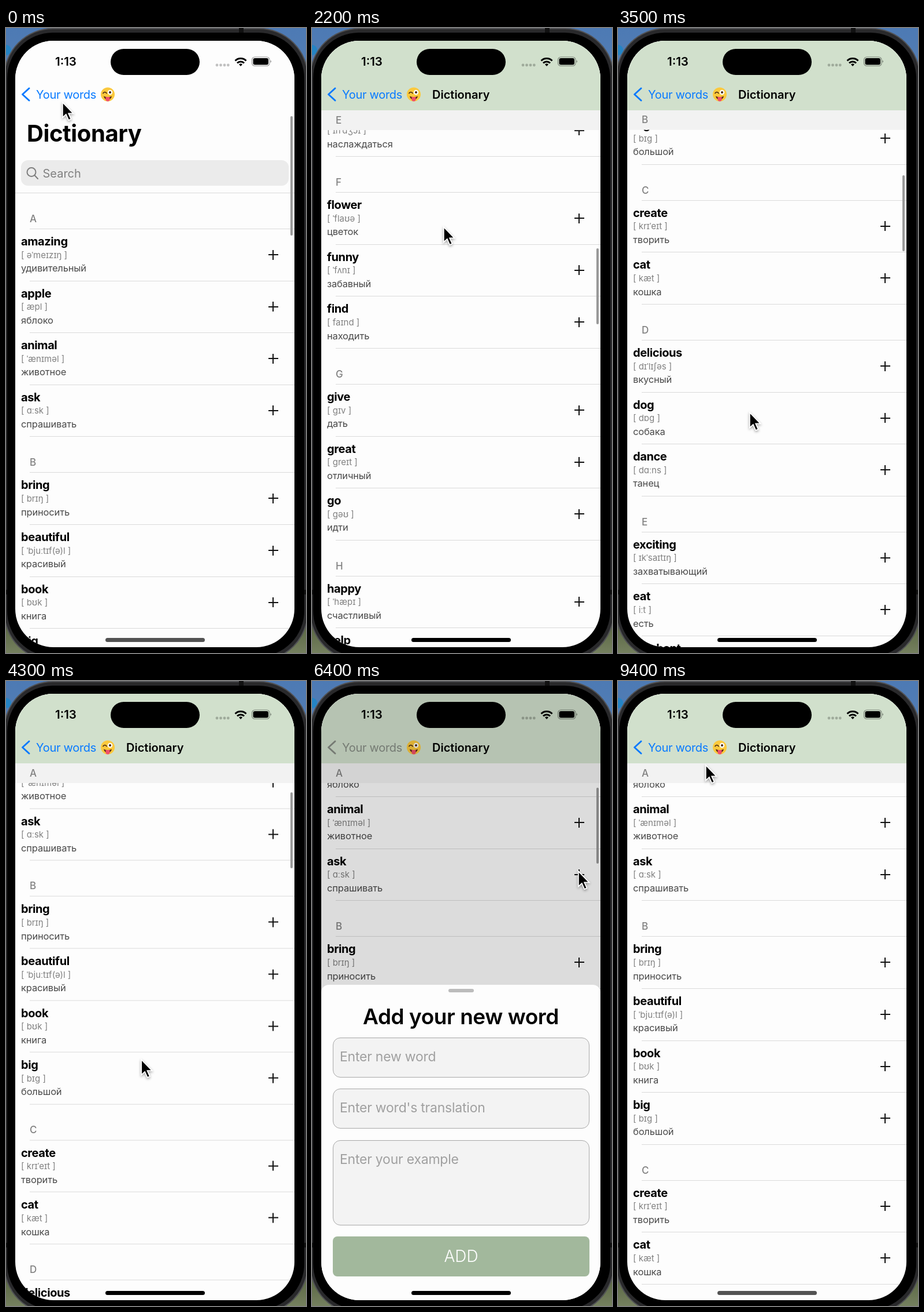
An HTML page for the animation above (9500 ms loop, 519 by 1078 pixels).

```html
<!DOCTYPE html>
<html lang="en">
<head>
<meta charset="utf-8">
<title>Dictionary</title>
<style>
html, body { margin: 0; width: 100%; height: 100%; overflow: hidden; background: #000; }
body { position: relative; font-family: Inter, "Noto Sans", sans-serif; color: #000; }
div, svg { position: absolute; box-sizing: border-box; }
.full { left: 0; top: 0; width: 519px; height: 1078px; }
.text { white-space: pre; line-height: 1.2; transform: translateY(-50%); }
#screen { background: #fdfdfd; clip-path: inset(22px 20px 10px 16px round 66px); }
#list { left: 0; top: 284px; width: 519px; }
.head { left: 16px; width: 483px; height: 34px; z-index: 1; }
.head.pinned { background: #f2f2f2; }
.head .text { left: 25px; top: 17px; font-size: 17px; font-weight: 500; color: #808080; }
.line { left: 41px; width: 458px; height: 1px; background: #dadada; }
.row { left: 0; width: 519px; height: 89.6px; }
.row .text { left: 26px; }
.word { top: 22px; font-size: 20px; font-weight: 700; letter-spacing: -.02em; }
.sound { top: 45.7px; font-size: 15px; color: #808080; }
.meaning { top: 69.3px; font-size: 16.5px; letter-spacing: -.01em; color: #4a4a4a; }
.plus { left: 453.5px; top: 44px; width: 17px; height: 2px; background: #111; }
.plus::after { content: ""; position: absolute; left: 7.5px; top: -7.5px; width: 2px; height: 17px; background: #111; }
#nav { left: 0; top: 0; width: 519px; height: 142px; background: #fdfdfd; }
#navTint { inset: 0; background: #d1e0cc; }
#back { left: 52px; top: 114.5px; font-size: 20px; letter-spacing: -.015em; }
#navTitle { left: 208px; top: 114.5px; font-size: 20px; font-weight: 600; }
#large { left: 16px; top: 142px; width: 483px; overflow: hidden; background: #fdfdfd; border-bottom: 1px solid #dadada; }
#largeTitle { left: 20px; top: 40px; font-size: 40px; font-weight: 700; letter-spacing: -.01em; }
#search { left: 10px; top: 86px; width: 463px; border-radius: 12px; background: #ebebeb; overflow: hidden; color: #808080; font-size: 20px; }
#bar { left: 491.5px; width: 4px; border-radius: 2px; background: #999; }
#dim { background: #000; }
#sheet { left: 16px; top: 524px; width: 483px; height: 560px; border-radius: 13px 13px 0 0; background: #fdfdfd; }
#grabber { left: 220px; top: 7px; width: 44px; height: 6px; border-radius: 3px; background: #bcbcbc; }
#sheetTitle { left: 0; width: 483px; top: 55px; text-align: center; font-size: 37px; font-weight: 600; letter-spacing: -.012em; }
.field { left: 20px; width: 444px; border: 1.3px solid #a8a8a8; border-radius: 13px; background: #f3f3f3; }
.field .text { left: 11px; top: 33px; font-size: 23px; letter-spacing: -.01em; color: #a0a0a0; }
#add { left: 20px; top: 433.5px; width: 444px; height: 69px; border-radius: 8px; background: #a2b89c; }
#add .text { left: 0; width: 100%; top: 35px; text-align: center; font-size: 28px; font-weight: 300; color: #fff; }
#home { left: 172px; top: 1052px; width: 172px; height: 7px; border-radius: 4px; }
#time { left: 85px; top: 58px; font-size: 20.5px; font-weight: 600; }
#cursor { left: -4px; top: -4px; overflow: visible; filter: drop-shadow(0 2px 2px rgba(0,0,0,.35)); }
</style>
</head>
<body>
<svg class="full" viewBox="0 0 519 1078">
  <defs>
    <linearGradient id="wall" x2="0" y2="1">
      <stop offset="0" stop-color="#4d7ab4"/><stop offset=".5" stop-color="#7795b5"/>
      <stop offset=".95" stop-color="#56633f"/><stop offset="1" stop-color="#75805f"/>
    </linearGradient>
  </defs>
  <rect width="519" height="1078" fill="url(#wall)"/>
  <circle cx="0" cy="38" r="9" fill="#2584c4"/>
  <rect x="-3" y="1" width="525" height="1090" rx="84" fill="#29292b" stroke="#515255" stroke-width="2"/>
  <path d="M403 0h8v8h-8zM0 969h3v8h-3zM516 969h3v8h-3z" fill="#111"/>
  <rect x="2" y="8" width="514" height="1076" rx="79"/>
</svg>

<div id="screen" class="full">
  <div id="list"></div>
  <div id="large">
    <div id="largeTitle" class="text">Dictionary</div>
    <div id="search">
      <svg width="44" height="44" fill="none" stroke="#7f7f7f" stroke-width="2" stroke-linecap="round">
        <circle cx="18" cy="20.5" r="7.5"/><path d="M23.5 26l5.5 6"/>
      </svg>
      <div class="text" style="left:37.5px;top:22.5px">Search</div>
    </div>
  </div>
  <div id="nav">
    <div id="navTint"></div>
    <svg width="519" height="142">
      <path id="chevron" d="M40 104L28.5 114.5L40 125" fill="none" stroke-width="3" stroke-linecap="round" stroke-linejoin="round"/>
      <g transform="translate(176 114.5)">
        <circle r="12" fill="#fbc93d"/>
        <circle cx="4" cy="-3.5" r="4.2" fill="#fff"/><circle cx="4" cy="-3.5" r="2" fill="#4b2c14"/>
        <path d="M-8-2q3-4 6 0" fill="none" stroke="#4b2c14" stroke-width="1.7" stroke-linecap="round"/>
        <path d="M-7 3q7 3 14 0q-1 6-7 6t-7-6" fill="#5a2b12"/>
        <path d="M-3.5 4.5h7v4a3.5 3.5 0 0 1-7 0z" fill="#f0506a"/>
      </g>
      <g fill="#000" fill-opacity=".24">
        <circle cx="365" cy="64" r="2.4"/><circle cx="371.5" cy="64" r="2.4"/>
        <circle cx="378" cy="64" r="2.4"/><circle cx="384.3" cy="64" r="2.4"/>
      </g>
      <g fill="none" stroke="#000" stroke-width="3">
        <path d="M396.5 56.5a13.5 13.5 0 0 1 19 0M400 60.5a8.5 8.5 0 0 1 12 0"/>
      </g>
      <path d="M406 66l-3-3.2a4.4 4.4 0 0 1 6 0z"/>
      <rect x="425.5" y="50" width="30.5" height="15.5" rx="5" fill="none" stroke="#000" stroke-opacity=".4" stroke-width="1.2"/>
      <rect x="427.5" y="52" width="26.5" height="11.5" rx="3.2"/>
      <path d="M457.5 55.5q3 2 0 4.5z" fill-opacity=".45"/>
    </svg>
    <div id="time" class="text">1:13</div>
    <div id="back" class="text">Your words</div>
    <div id="navTitle" class="text">Dictionary</div>
  </div>
  <div id="bar"></div>
  <div id="dim" class="full"></div>
  <div id="sheet">
    <div id="grabber"></div>
    <div id="sheetTitle" class="text">Add your new word</div>
    <div class="field" style="top:91px;height:68.5px"><div class="text">Enter new word</div></div>
    <div class="field" style="top:179px;height:68.5px"><div class="text">Enter word's translation</div></div>
    <div class="field" style="top:268px;height:147px"><div class="text">Enter your example</div></div>
    <div id="add"><div class="text">ADD</div></div>
  </div>
  <div id="home"></div>
  <div style="left:181px;top:36px;width:154px;height:45px;border-radius:23px;background:#000"></div>
</div>

<svg id="cursor" width="30" height="42">
  <path transform="translate(4 4)" d="M.8 1V27.5L6.8 22L11.3 32L15.6 30.2L11.2 20.3H19.5Z" stroke="#fff" stroke-width="1.8"/>
</svg>

<script>
const LOOP = 9500, STEP = 100, ROW = 89.6, GAP = 28, HEAD = 34, LIST_TOP = 284, NAV = 142;

const dictionary = {
  A: ["amazing|əˈmeɪzɪŋ|удивительный", "apple|æpl|яблоко", "animal|ˈænɪməl|животное", "ask|ɑːsk|спрашивать"],
  B: ["bring|brɪŋ|приносить", "beautiful|ˈbjuːtɪf(ə)l|красивый", "book|bʊk|книга", "big|bɪɡ|большой"],
  C: ["create|krɪˈeɪt|творить", "cat|kæt|кошка"],
  D: ["delicious|dɪˈlɪʃəs|вкусный", "dog|dɒɡ|собака", "dance|dɑːns|танец"],
  E: ["exciting|ɪkˈsaɪtɪŋ|захватывающий", "eat|iːt|есть", "elephant|ˈelɪfənt|слон", "enjoy|ɪnˈdʒɔɪ|наслаждаться"],
  F: ["flower|ˈflaʊə|цветок", "funny|ˈfʌnɪ|забавный", "find|faɪnd|находить"],
  G: ["give|ɡɪv|дать", "great|ɡreɪt|отличный", "go|ɡəʊ|идти"],
  H: ["happy|ˈhæpɪ|счастливый", "help|help|помогать", "house|haʊs|дом"]
};

// Keyframes: time, then values; motion eases between neighbours.
const scrollKeys = [[0, 0], [600, 0], [1400, 950], [2200, 1896], [2800, 1896], [3500, 890], [4500, 338], [5200, 338], [5500, 326]];
const cursorKeys = [[0, 97, 127], [600, 227, 760], [1100, 227, 342], [1500, 227, 720], [2000, 227, 342], [2700, 227, 342],
  [3300, 227, 662], [4200, 227, 662], [5200, 452, 302], [5800, 460, 327], [6700, 460, 327], [7400, 384, 343], [8200, 384, 343], [9400, 151, 144]];
const sheetKeys = [[0, 548], [5850, 548], [6350, 0], [7500, 0], [7975, 548]];
const barKeys = [[0, 1], [6500, 1], [6900, 0]];

const $ = id => document.getElementById(id);
const clamp = (x, lo = 0, hi = 1) => Math.min(hi, Math.max(lo, x));

function track(keys, t) {
  const next = keys.findIndex(key => key[0] > t);
  if (next < 0) return keys[keys.length - 1].slice(1);
  const a = keys[next - 1], b = keys[next];
  const p = (t - a[0]) / (b[0] - a[0]), ease = p * p * (3 - 2 * p);
  return a.slice(1).map((v, i) => v + (b[i + 1] - v) * ease);
}

function add(parent, className, text = "", top) {
  const el = document.createElement("div");
  el.className = className;
  el.textContent = text;
  if (top !== undefined) el.style.top = top + "px";
  return parent.appendChild(el);
}

const sections = [];
let y = 0;
for (const [letter, entries] of Object.entries(dictionary)) {
  const top = y + GAP;
  const head = add($("list"), "head", "", top);
  add(head, "text", letter);
  y = top + HEAD;
  add($("list"), "line", "", y);
  for (const entry of entries) {
    const [word, sound, meaning] = entry.split("|");
    const row = add($("list"), "row", "", y);
    add(row, "text word", word);
    add(row, "text sound", `[ ${sound} ]`);
    add(row, "text meaning", meaning);
    add(row, "plus");
    y += ROW;
    add($("list"), "line", "", y);
  }
  sections.push({ head, top, end: y });
}

function render(t) {
  const [scroll] = track(scrollKeys, t);
  const [x, y] = track(cursorKeys, t);
  const [drop] = track(sheetKeys, t);
  const navBottom = Math.max(NAV, 285 - scroll);
  const expanded = clamp(1 - scroll / 142);

  $("list").style.transform = `translateY(${-scroll}px)`;
  for (const { head, top, end } of sections) {
    const shift = clamp(navBottom - (LIST_TOP + top - scroll), 0, end - top - HEAD);
    head.style.transform = `translateY(${shift}px)`;
    head.classList.toggle("pinned", shift > 0);
  }

  $("large").style.height = navBottom - NAV + "px";
  $("large").style.visibility = expanded ? "visible" : "hidden";
  $("largeTitle").style.marginTop = -Math.max(0, scroll - 57) + "px";
  $("search").style.height = Math.max(0, 44 - scroll) + "px";
  $("navTint").style.opacity = $("navTitle").style.opacity = clamp((scroll - 115) / 27);

  const bar = $("bar").style;
  bar.top = 142.75 + scroll * .125 + 9 * expanded + "px";
  bar.height = 131 + 75 * expanded + "px";
  bar.opacity = track(barKeys, t)[0];

  $("dim").style.opacity = .13 * (1 - drop / 548);
  $("sheet").style.transform = `translateY(${drop}px)`;
  const tint = until => t >= 5900 && t < until ? "#868c84" : "#087aff";
  $("chevron").style.stroke = tint(7700);
  $("back").style.color = tint(7600);
  $("home").style.background = t < 700 || t >= 7600 ? "rgba(60,60,60,.88)" : "#000";
  $("cursor").style.transform = `translate(${x}px,${y}px)`;
}

function frame() {
  const t = performance.now() % LOOP;
  render(Math.floor(t / STEP) * STEP);
  requestAnimationFrame(frame);
}
frame();
</script>
</body>
</html>
```
